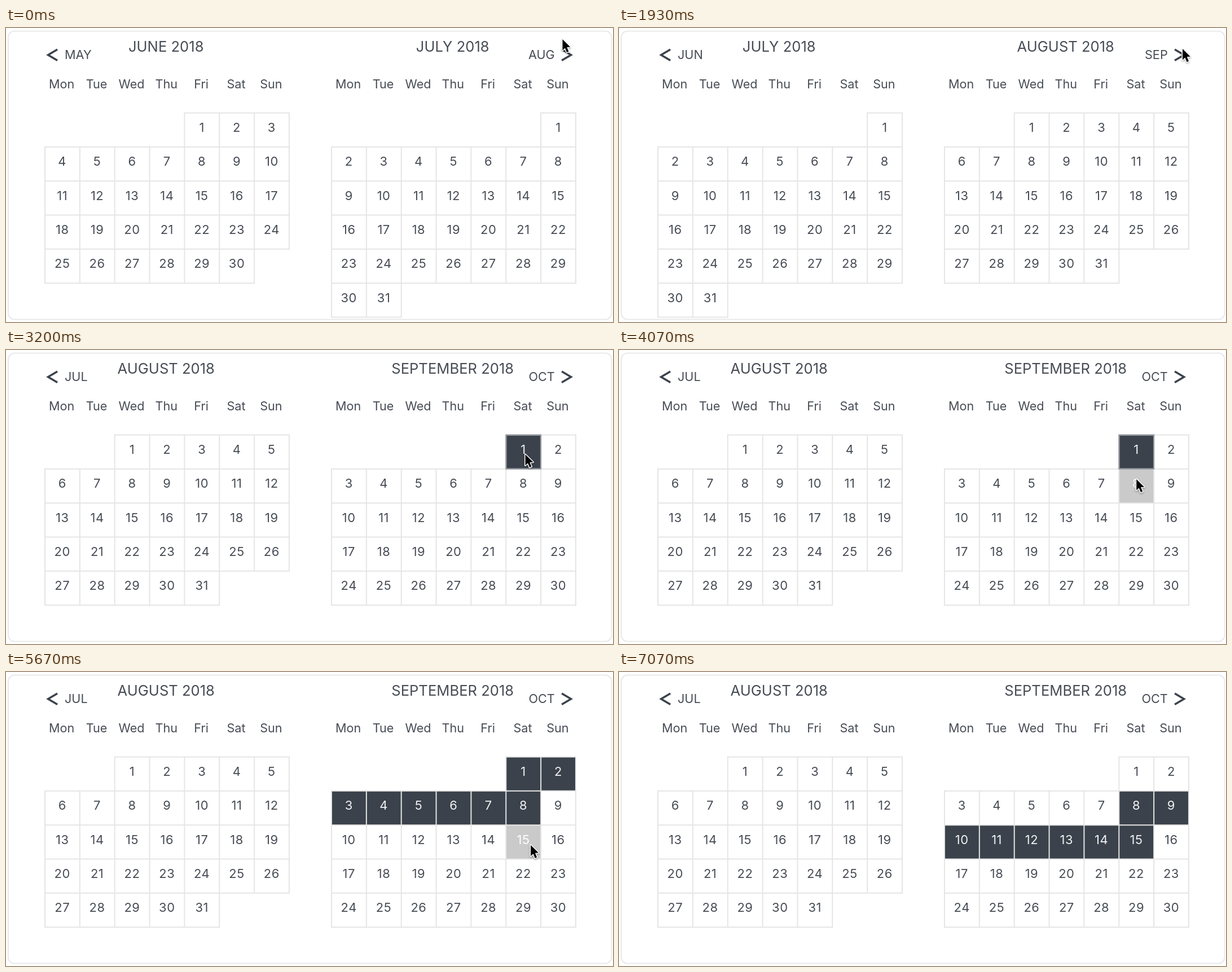
Animation of 1076x521 px, one loop 8000 ms. Source, as an HTML page with a canvas:

```html
<!DOCTYPE html>
<html lang="en">
<head>
<meta charset="utf-8">
<title>Date range picker</title>
<style>
  html, body { margin: 0; width: 100%; height: 100%; overflow: hidden; background: #fff; }
  canvas { display: block; width: 1076px; height: 521px; }
</style>
</head>
<body>
<canvas id="stage"></canvas>
<script>
const W = 1076, H = 521, LOOP = 8000, TICK = 1000 / 15;
const CELL_W = 61.86, CELL_H = 60.33, GRID_TOP = 150.5;
const LEFT_X = 69, RIGHT_X = LEFT_X + 508;
const FONT = 21.65, TITLE_FONT = 25.6;
const INK = '#474c55', DARK = '#3b424b', HOVER = '#cacaca', LINE = '#e5e5e5';
const JUNE = 5, SEPTEMBER = 8;

const canvas = document.getElementById('stage');
const ctx = canvas.getContext('2d');
const dpr = window.devicePixelRatio || 1;
canvas.width = W * dpr;
canvas.height = H * dpr;

function monthName(month, style = 'long') {
  const date = new Date(Date.UTC(2018, month, 1));
  return date.toLocaleDateString('en-US', { month: style, timeZone: 'UTC' }).toUpperCase();
}

function monthCells(month, left) {
  const start = (new Date(Date.UTC(2018, month, 1)).getUTCDay() + 6) % 7;
  const count = new Date(Date.UTC(2018, month + 1, 0)).getUTCDate();
  return Array.from({ length: count }, (_, i) => ({
    day: i + 1,
    x: left + (start + i) % 7 * CELL_W,
    y: GRID_TOP + Math.floor((start + i) / 7) * CELL_H
  }));
}

// A point inside a September day, as fractions of its cell
function over(day, fx, fy) {
  const cell = monthCells(SEPTEMBER, RIGHT_X)[day - 1];
  return { x: cell.x + fx * CELL_W, y: cell.y + fy * CELL_H };
}

// Each move runs between two ticks; bow bends its path away from the straight line
const START = { x: 986.5, y: 20 };
const MOVES = [
  { from: 0, to: 3, end: { x: 990, y: 38 } },
  { from: 8, to: 10, end: { x: 991.5, y: 54 } },
  { from: 19, to: 21, end: { x: 999, y: 37 } },
  { from: 33, to: 42, end: over(1, 0.56, 0.49), bow: { x: -10, y: 4 } },
  { from: 47, to: 57, end: over(8, 0.5, 0.3) },
  { from: 68, to: 76, end: over(8, 0.51, 0.58), bow: { x: 0, y: 28 } },
  { from: 78, to: 85, end: over(15, 0.71, 0.59), bow: { x: 21, y: 35 } },
  { from: 95, to: 100, end: { x: W + 4, y: 309 } }
];

function pointerAt(tick) {
  let at = START;
  for (const { from, to, end, bow = { x: 0, y: 0 } } of MOVES) {
    if (tick <= from) break;
    const k = Math.min(1, (tick - from) / (to - from));
    const bend = Math.sin(Math.PI * k);
    at = {
      x: at.x + (end.x - at.x) * k + bow.x * bend,
      y: at.y + (end.y - at.y) * k + bow.y * bend
    };
  }
  return at;
}

const firstMonth = tick => JUNE + (tick >= 19) + (tick >= 30);

function selection(tick) {
  if (tick >= 90) return [8, 15];
  if (tick >= 62) return [1, 8];
  return tick >= 45 ? [1, 1] : null;
}

function text(str, x, y, { size = FONT, align = 'center', color = INK, spacing = 0 } = {}) {
  ctx.font = `400 ${size}px Inter, sans-serif`;
  ctx.letterSpacing = spacing + 'px';
  ctx.textAlign = align;
  ctx.fillStyle = color;
  ctx.fillText(str, x, y);
}

function outline(cells, color) {
  ctx.strokeStyle = color;
  ctx.lineWidth = 2;
  ctx.beginPath();
  cells.forEach(c => ctx.rect(c.x, c.y, CELL_W, CELL_H));
  ctx.stroke();
}

function drawMonth(month, left, range, pointer) {
  const cells = monthCells(month, left);
  text(monthName(month) + ' 2018', left + 3.5 * CELL_W - 1.8, 42, { size: TITLE_FONT });
  ['Mon', 'Tue', 'Wed', 'Thu', 'Fri', 'Sat', 'Sun'].forEach((name, i) =>
    text(name, left + (i + 0.5) * CELL_W - 1.2, 107));

  for (const c of cells) {
    c.picked = range && c.day >= range[0] && c.day <= range[1];
    c.hover = pointer.x >= c.x && pointer.x < c.x + CELL_W &&
      pointer.y >= c.y && pointer.y < c.y + CELL_H;
    if (c.picked || c.hover) {
      ctx.fillStyle = c.picked ? DARK : HOVER;
      ctx.fillRect(c.x, c.y, CELL_W, CELL_H);
    }
  }

  outline(cells, LINE);
  // A lone start day keeps a stronger edge until the range is complete
  const picked = cells.filter(c => c.picked);
  if (picked.length === 1) outline(picked, '#94989f');

  for (const c of cells) {
    const color = c.picked ? '#f1f1f3' : c.hover ? '#fff' : INK;
    text(c.day, c.x + CELL_W / 2 - 0.2, c.y + 33.5, { size: 22, color, spacing: 0.5 });
  }
}

function chevron(tipX, dir) {
  ctx.beginPath();
  for (const side of [-1, 0, 1]) {
    ctx.lineTo(tipX + dir * Math.abs(side) * 16.5, 47.8 + side * 9.8);
  }
  ctx.stroke();
}

function drawNav(first) {
  text(monthName(first - 1, 'short'), 104, 55, { align: 'left' });
  text(monthName(first + 2, 'short'), 972.7, 55, { align: 'right' });
  ctx.strokeStyle = DARK;
  ctx.lineWidth = 3.5;
  chevron(74.6, 1);
  chevron(1001.6, -1);
}

function drawPointer({ x, y }) {
  const half = [[7.5, 18], [1.8, 16], [1.8, 24.3]];
  const mirrored = half.map(([px, py]) => [-px, py]).reverse();
  ctx.save();
  ctx.translate(x, y);
  ctx.rotate(-Math.PI / 8);
  ctx.beginPath();
  ctx.moveTo(0, 0);
  [...half, ...mirrored].forEach(p => ctx.lineTo(...p));
  ctx.closePath();
  ctx.lineJoin = 'round';
  ctx.shadowColor = 'rgba(0,0,0,0.35)';
  ctx.shadowBlur = 3 * dpr;
  ctx.shadowOffsetY = 1.5 * dpr;
  ctx.strokeStyle = '#fff';
  ctx.lineWidth = 3;
  ctx.stroke();
  ctx.shadowColor = 'transparent';
  ctx.fillStyle = '#000';
  ctx.fill();
  ctx.restore();
}

function draw(ms) {
  const tick = Math.floor((ms % LOOP + 5) / TICK) % 120;
  const first = firstMonth(tick);
  const pointer = pointerAt(tick);

  ctx.setTransform(dpr, 0, 0, dpr, 0, 0);
  ctx.fillStyle = '#fff';
  ctx.fillRect(0, 0, W, H);
  ctx.strokeStyle = '#e9e9e9';
  ctx.lineWidth = 2;
  ctx.beginPath();
  ctx.roundRect(4, 5.5, 1069.5, 511, 11);
  ctx.stroke();

  drawMonth(first, LEFT_X, null, pointer);
  drawMonth(first + 1, RIGHT_X, selection(tick), pointer);
  drawNav(first);
  if (pointer.x < W) drawPointer(pointer);
}

const began = performance.now();
function loop() {
  draw(performance.now() - began);
  requestAnimationFrame(loop);
}
loop();
</script>
</body>
</html>
```
